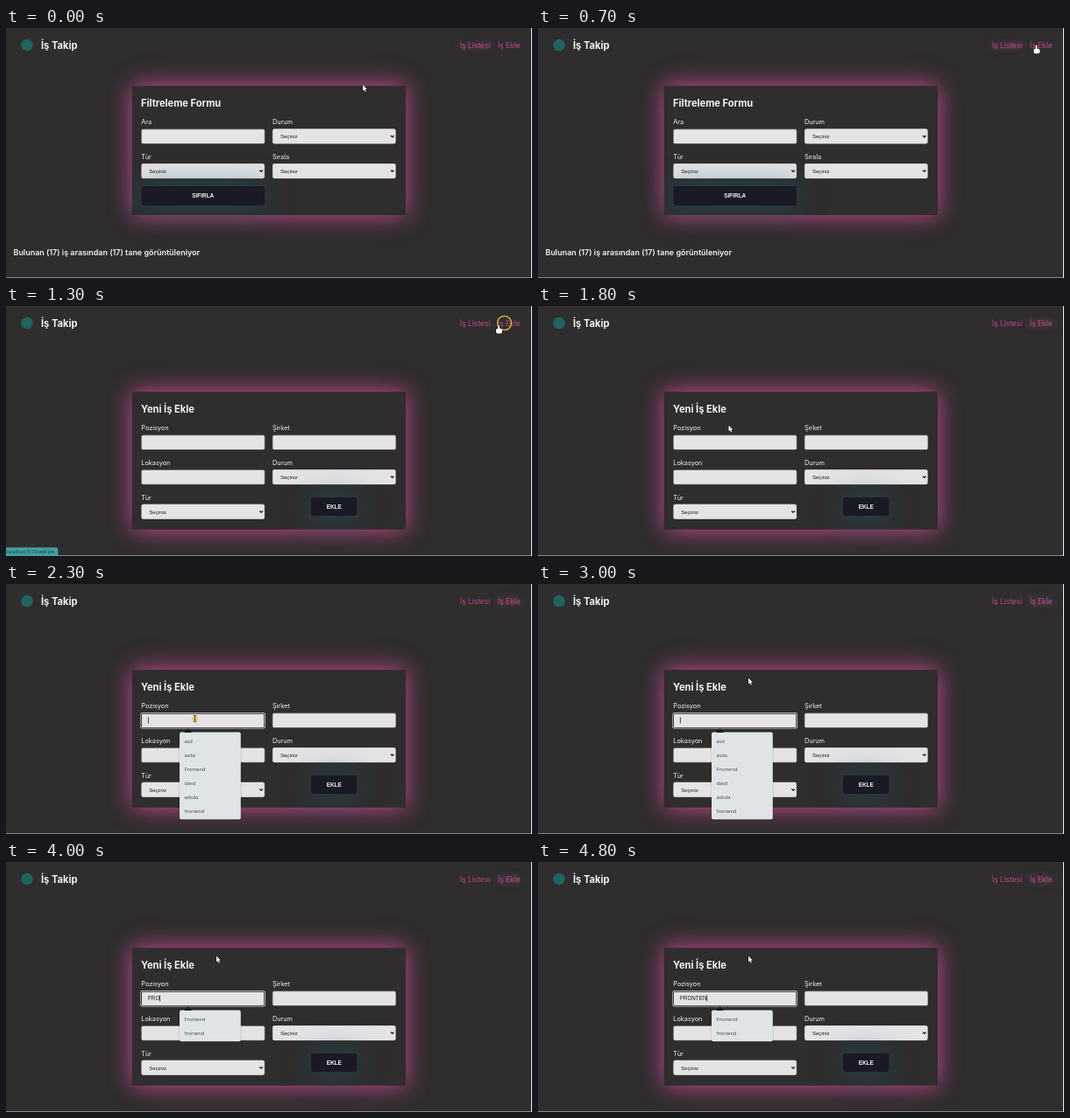
An HTML page with a canvas that plays this animation: 600 px wide and 286 px high, repeating every 5000 ms.

```html
<!DOCTYPE html>
<html lang="tr">
<head>
<meta charset="utf-8">
<title>İş Takip</title>
<style>
html, body { margin: 0; width: 100%; height: 100%; overflow: hidden; background: #2f2d2e; }
canvas { display: block; }
</style>
</head>
<body>
<canvas id="stage" width="600" height="286"></canvas>
<script>
const ctx = document.getElementById('stage').getContext('2d');
const LOOP = 5000, TICK = 100;
const UI = 'Inter, sans-serif', FORM = '"Liberation Sans", Arial, sans-serif', POPUP = '"Open Sans", sans-serif';
const BG = '#2f2d2e', FIELD = '#e5e3e6', PINK = '#c2488f', INK = '#1c1b1e';

const LINK = { x: 568.5, y: 19.5 }, INPUT = { x: 215.5, y: 154 };
const START = { x: 407, y: 65 };
const MOVES = [
  { from: 0, to: 700, goal: LINK },
  { from: 1200, to: 1800, goal: { x: 217.5, y: 136.5 } },
  { from: 1800, to: 2000, goal: INPUT },
  { from: 2400, to: 2600, goal: { x: 240, y: 107.5 } }
];
const PAGE_CHANGE = 1300, FOCUS = 2200, FILTER = 3400, FIRST_KEY = 3600;
const KEYS = [FIRST_KEY, 3900, 4000, 4100, 4500, 4500, 4800];

const clamp = v => Math.max(0, Math.min(1, v));
const ease = k => k < .5 ? 4 * k ** 3 : 1 - 4 * (1 - k) ** 3;

function pointer(t) {
  return MOVES.reduce((p, { from, to, goal }) => {
    const k = ease(clamp((t - from) / (to - from)));
    return { x: p.x + (goal.x - p.x) * k, y: p.y + (goal.y - p.y) * k };
  }, START);
}

function text(s, x, y, size, { weight = 400, color = '#f4f3f4', family = UI, align = 'left' } = {}) {
  ctx.font = `${weight} ${size}px ${family}`;
  ctx.fillStyle = color;
  ctx.textAlign = align;
  ctx.fillText(s, x, y);
}

function box(x, y, w, h, r, fill) {
  ctx.beginPath();
  ctx.roundRect(x, y, w, h, r);
  ctx.fillStyle = fill;
  ctx.fill();
}

function glow(color, blur, draw, offset = 0) {
  ctx.save();
  ctx.shadowColor = color;
  ctx.shadowBlur = blur;
  ctx.shadowOffsetX = offset;
  draw();
  ctx.restore();
}

function card(y, h, title) {
  glow('#cf4c95', 25, () => box(143.7, y, 312.3, h, 0, BG));
  text(title, 154, y + 23.4, 11.1, { weight: 700 });
}

// Fields sit on a grid of two columns inside the card
function field(label, top, col, row) {
  const x = 154.3 + 149.6 * col, y = top + 49.3 + 39.7 * row;
  text(label, x, y - 5.5, 7.3);
  return [x, y];
}

function input(...cell) {
  const [x, y] = field(...cell);
  box(x, y, 141, 17, 2, '#8f8b91');
  box(x + .6, y + .6, 139.8, 15.8, 1.5, FIELD);
}

function select(...cell) {
  const [x, y] = field(...cell);
  box(x, y - .4, 140.8, 17.4, 2.5, '#9b979d');
  box(x + .4, y, 140, 16.6, 2, FIELD);
  text('Seçiniz', x + 9, y + 10.7, 6.1, { family: FORM, color: INK });
  ctx.beginPath();
  ctx.moveTo(x + 135, y + 7.4);
  ctx.lineTo(x + 136.8, y + 9.2);
  ctx.lineTo(x + 138.6, y + 7.4);
  ctx.strokeStyle = '#111';
  ctx.lineWidth = 1.2;
  ctx.stroke();
}

function button(label, x, y, w, h) {
  glow('rgba(18,100,112,.6)', 32, () => box(x, y, w, h, 3, '#191a25'));
  text(label, x + w / 2, y + h / 2 + 2.2, 6.4, { weight: 700, family: FORM, align: 'center' });
}

function link(label, x, lit) {
  // Only the haze lands on the stage; its text is drawn outside
  glow(`rgba(235,175,210,${.7 * lit})`, 11, () => text(label, x - 900, 22.5, 8.4), 900);
  text(label, x, 22.6, 8.4, { color: PINK });
}

function header(t) {
  ctx.beginPath();
  ctx.arc(24, 19.5, 6.8, 0, Math.PI * 2);
  ctx.fillStyle = '#1d655e';
  ctx.fill();
  text('İş Takip', 40, 23.6, 11.1, { weight: 700 });
  link('İş Listesi', 518, t < PAGE_CHANGE ? 1 : 0);
  link('İş Ekle', 561, clamp((t - PAGE_CHANGE) / 400));
}

function listPage() {
  const top = 66.3;
  card(top, 147.7, 'Filtreleme Formu');
  input('Ara', top, 0, 0);
  select('Durum', top, 1, 0);
  select('Tür', top, 0, 1);
  select('Sırala', top, 1, 1);
  button('SIFIRLA', 154.5, 181, 140.5, 22);
  text('Bulunan (17) iş arasından (17) tane görüntüleniyor', 8.5, 259.5, 8.95, { weight: 600 });
}

function addPage(t) {
  const top = 98.3;
  card(top, 157.5, 'Yeni İş Ekle');
  input('Pozisyon', top, 0, 0);
  input('Şirket', top, 1, 0);
  input('Lokasyon', top, 0, 1);
  select('Durum', top, 1, 1);
  select('Tür', top, 0, 2);
  button('EKLE', 348, 219, 52.3, 21);
  if (t >= FOCUS) focusedField(t);
  if (t > FOCUS) suggestions(t);
}

function focusedField(t) {
  box(153.4, 147.1, 142.4, 18.4, 2.5, '#dcdadd');
  box(154.1, 147.8, 141, 17, 2, '#2a282b');
  box(155, 148.7, 139.2, 15.2, 1, FIELD);
  const value = 'FRONTEN'.slice(0, KEYS.filter(key => key <= t).length);
  text(value, 162, 158.2, 6.3, { family: FORM, color: INK });
  const caretOn = t >= FIRST_KEY || t % 1000 < 500;
  if (caretOn) box(161.9 + ctx.measureText(value).width, 152.5, .8, 7, 0, INK);
}

function suggestions(t) {
  const all = ['asd', 'asda', 'Frontend', 'dasd', 'adsda', 'frontend'];
  const items = t < FILTER ? all : t <= FIRST_KEY ? all.slice(0, 2) : ['Frontend', 'frontend'];
  const clipped = t >= FILTER && t <= FIRST_KEY;
  const height = 16 * items.length + (clipped ? 6.5 : 3.8), fill = '#dfe5e6';
  glow('rgba(0,0,0,.3)', 2, () => box(198, 169.5, 69.8, height, clipped ? 0 : 2, fill));
  ctx.fill(new Path2D('M203 170L207.5 165.2L212 170Z'));
  items.forEach((s, i) => text(s, 203.5, 181.6 + 16 * i, 5.6, { family: POPUP, color: '#3b4143' }));
}

function status() {
  box(0, 276.3, 59.3, 9.7, [0, 2, 0, 0], '#439f9f');
  text('localhost:5173/add-job', 1, 283.2, 5.1, { family: POPUP, color: '#173638' });
}

function outlined(shape) {
  ctx.strokeStyle = '#151515';
  ctx.lineWidth = 1;
  ctx.stroke(shape);
  ctx.fillStyle = '#fff';
  ctx.fill(shape);
}

function arrow() {
  outlined(new Path2D('M0 0V6.8L1.6 5.4L2.7 7.9L3.8 7.4L2.8 5L4.8 4.9Z'));
}

function hand() {
  const shape = new Path2D();
  shape.roundRect(-1, 0, 1.9, 7, 1);
  shape.roundRect(-3, 4.2, 7, 5.6, 2);
  outlined(shape);
}

function beam() {
  box(-.4, -3.5, .9, 7, 0, '#4a4520');
  for (const y of [-3.8, 3]) box(-1.7, y, 3.4, .8, 0, '#4a4520');
}

// A click starts as a small dot and opens into a ring on the next tick
function click(t, start, { x, y }) {
  const age = (t - start) / TICK;
  if (age < 0 || age > 1) return;
  ctx.beginPath();
  ctx.arc(x, y, 3 + 5 * age, 0, Math.PI * 2);
  ctx.fillStyle = `rgba(215,185,50,${.5 * (1 - age)})`;
  ctx.fill();
  ctx.strokeStyle = `rgba(216,181,43,${.3 + .7 * age})`;
  ctx.lineWidth = 1.5;
  ctx.stroke();
}

function render(t) {
  ctx.fillStyle = BG;
  ctx.fillRect(0, 0, 600, 286);
  t < PAGE_CHANGE ? listPage() : addPage(t);
  header(t);
  box(0, 285, 600, 1, 0, 'rgba(225,220,225,.5)');
  box(599, 0, 1, 286, 0, '#f2f1f2');
  if (t >= 800 && t < 1800) status();
  click(t, 1200, LINK);
  click(t, 2300, INPUT);

  const { x, y } = pointer(t);
  ctx.save();
  ctx.translate(x, y);
  if (t >= 700 && t < 1500) hand();
  else if (t >= 2000 && t < 2500) beam();
  else arrow();
  ctx.restore();
}

function loop() {
  render(Math.floor(performance.now() % LOOP / TICK) * TICK);
  requestAnimationFrame(loop);
}
loop();
</script>
</body>
</html>
```
